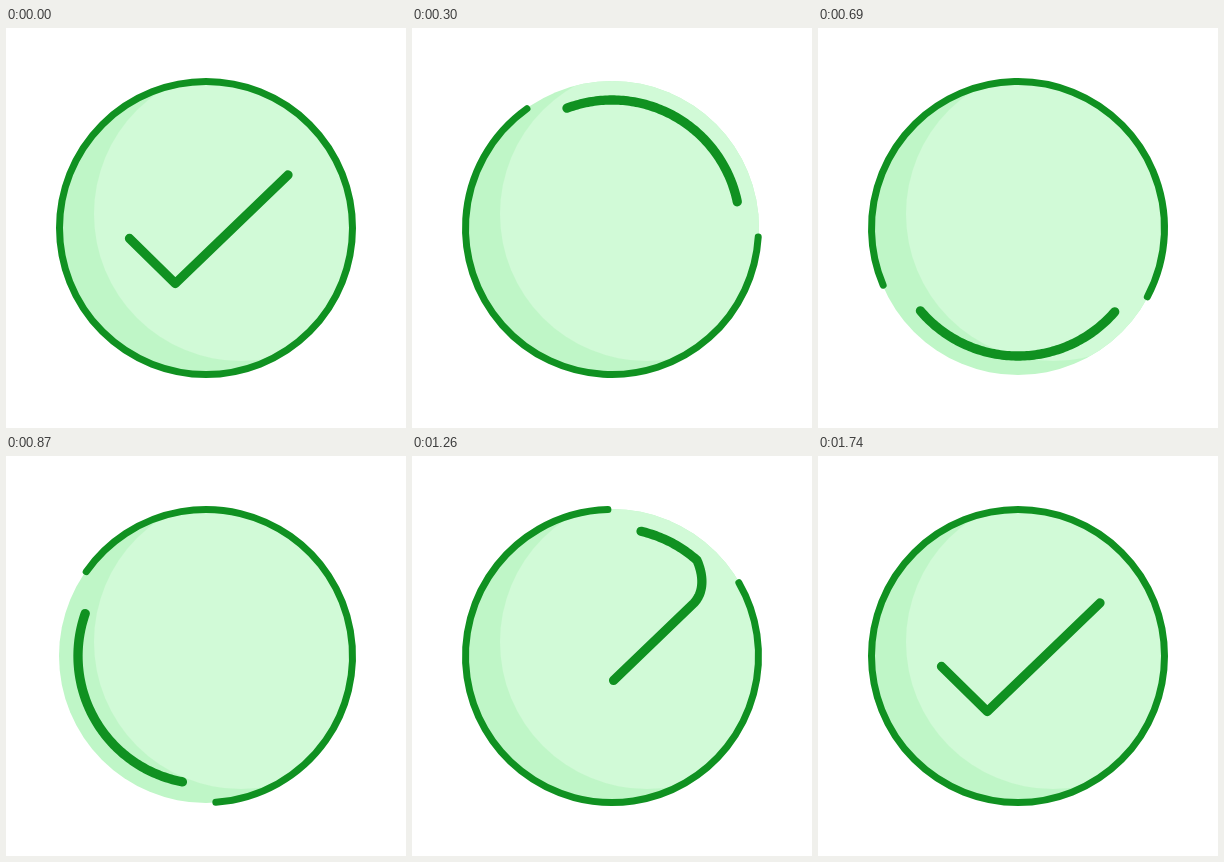
Write an HTML page with a canvas that moves like this. It is 400x400 px and loops after 3.86 s.

```html
<!DOCTYPE html>
<html lang="en">
<head>
<meta charset="utf-8">
<title>Check mark</title>
<style>
  html, body { margin: 0; width: 100%; height: 100%; overflow: hidden; background: #fff; }
  canvas { display: block; width: 400px; height: 400px; }
</style>
</head>
<body>
<canvas id="stage"></canvas>
<script>
const LOOP = 3860, STEP = 30;
const GREEN = '#109121', LIGHT = '#d1fad7', SHADE = '#bff6c7';
const CENTER = 200, DISC = 147, RING = 146.5, ORBIT = 128;
const JOIN = -75, CORNER = 401.6;               // clockwise degrees from the top
const GAP = 129, GAP_OPEN = -90, GAP_CLOSE = 420;
const RAD = Math.PI / 180;
const PX_PER_DEG = ORBIT * RAD;

const canvas = document.getElementById('stage');
const ctx = canvas.getContext('2d');
const dpr = window.devicePixelRatio || 1;
canvas.width = canvas.height = 400 * dpr;
ctx.scale(dpr, dpr);
ctx.lineCap = ctx.lineJoin = 'round';

const tick = [[282, 147], [169.3, 255.5], [123.5, 210.5]];

function onOrbit(deg) {
  return [CENTER + ORBIT * Math.sin(deg * RAD), CENTER - ORBIT * Math.cos(deg * RAD)];
}

function bezier(a, b, c, d, n = 24) {
  return Array.from({ length: n }, (_, i) => {
    const u = (i + 1) / n, v = 1 - u;
    return [0, 1].map(k =>
      v * v * v * a[k] + 3 * v * v * u * b[k] + 3 * v * u * u * c[k] + u * u * u * d[k]);
  });
}

function lengths(points) {
  let sum = 0;
  return points.map((p, i) =>
    i ? sum += Math.hypot(p[0] - points[i - 1][0], p[1] - points[i - 1][1]) : 0);
}

// Track: tick, way out to the orbit, more than one turn, way back into the tick
const track = [...tick, ...bezier(tick[2], [101, 188.5], [72, 182], onOrbit(JOIN))];
const joinAt = lengths(track).at(-1);
for (let deg = JOIN + 1; deg < CORNER; deg++) track.push(onOrbit(deg));
track.push(onOrbit(CORNER));
track.push(...bezier(onOrbit(CORNER), [291, 118], [293, 135], tick[0]));
const tickAt = lengths(track).at(-1);
track.push(tick[1], tick[2]);
const marks = lengths(track);
const tickLength = lengths(tick)[2];

const toDeg = s => JOIN + (s - joinAt) / PX_PER_DEG;
const toLength = deg => joinAt + (deg - JOIN) * PX_PER_DEG;

// time, tail of the tick, tail of the ring gap, speed in degrees per ms
const keys = [
  [0, toDeg(0), GAP_OPEN - GAP, 0],
  [300, -20.6, -35.5, 0.56],
  [480, 60.6, 45.8, 0.38],
  [690, 130.9, 118, 0.32],
  [1050, 259.3, 243.3, 0.42],
  [1260, 373.1, 358.4, 0.36],
  [1650, toDeg(tickAt), GAP_CLOSE, 0]
];

function valueAt(t, col) {
  const i = keys.findIndex(k => k[0] > t);
  if (i < 0) return keys.at(-1)[col];
  const a = keys[i - 1], b = keys[i];
  const d = b[0] - a[0], u = (t - a[0]) / d, v = 1 - u;
  return v * v * (1 + 2 * u) * a[col] + u * u * (3 - 2 * u) * b[col]
    + d * u * v * (v * a[3] - u * b[3]);
}

function pointAt(s) {
  let i = marks.findIndex(m => m >= s);
  if (i < 0) return track.at(-1);
  if (i === 0) return track[0];
  const u = (s - marks[i - 1]) / (marks[i] - marks[i - 1]);
  return [0, 1].map(k => track[i - 1][k] + u * (track[i][k] - track[i - 1][k]));
}

function disc(x, y, r, color) {
  ctx.beginPath();
  ctx.arc(x, y, r, 0, 2 * Math.PI);
  ctx.fillStyle = color;
  ctx.fill();
}

function drawDisc() {
  disc(CENTER, CENTER, DISC, SHADE);
  ctx.save();
  ctx.beginPath();
  ctx.arc(CENTER, CENTER, DISC, 0, 2 * Math.PI);
  ctx.clip();
  disc(235, 186, DISC, LIGHT);
  ctx.restore();
}

function drawRing(t) {
  const pos = valueAt(t, 2);
  const tail = Math.max(pos, GAP_OPEN);
  const head = Math.min(pos + GAP, GAP_CLOSE);
  ctx.beginPath();
  if (head - tail < 0.1) ctx.arc(CENTER, CENTER, RING, 0, 2 * Math.PI);
  else ctx.arc(CENTER, CENTER, RING, (head - 90) * RAD, (tail + 270) * RAD);
  ctx.lineWidth = 7;
  ctx.stroke();
}

function drawTick(t) {
  const from = toLength(valueAt(t, 1)), to = from + tickLength;
  const inner = track.filter((_, i) => marks[i] > from && marks[i] < to);
  ctx.beginPath();
  for (const p of [pointAt(from), ...inner, pointAt(to)]) ctx.lineTo(...p);
  ctx.lineWidth = 9.3;
  ctx.stroke();
}

function draw(now) {
  const t = Math.floor((now % LOOP) / STEP) * STEP;
  ctx.clearRect(0, 0, 400, 400);
  ctx.strokeStyle = GREEN;
  drawDisc();
  drawRing(t);
  drawTick(t);
}

const start = performance.now();
function frame() {
  draw(performance.now() - start);
  requestAnimationFrame(frame);
}
frame();
</script>
</body>
</html>
```
